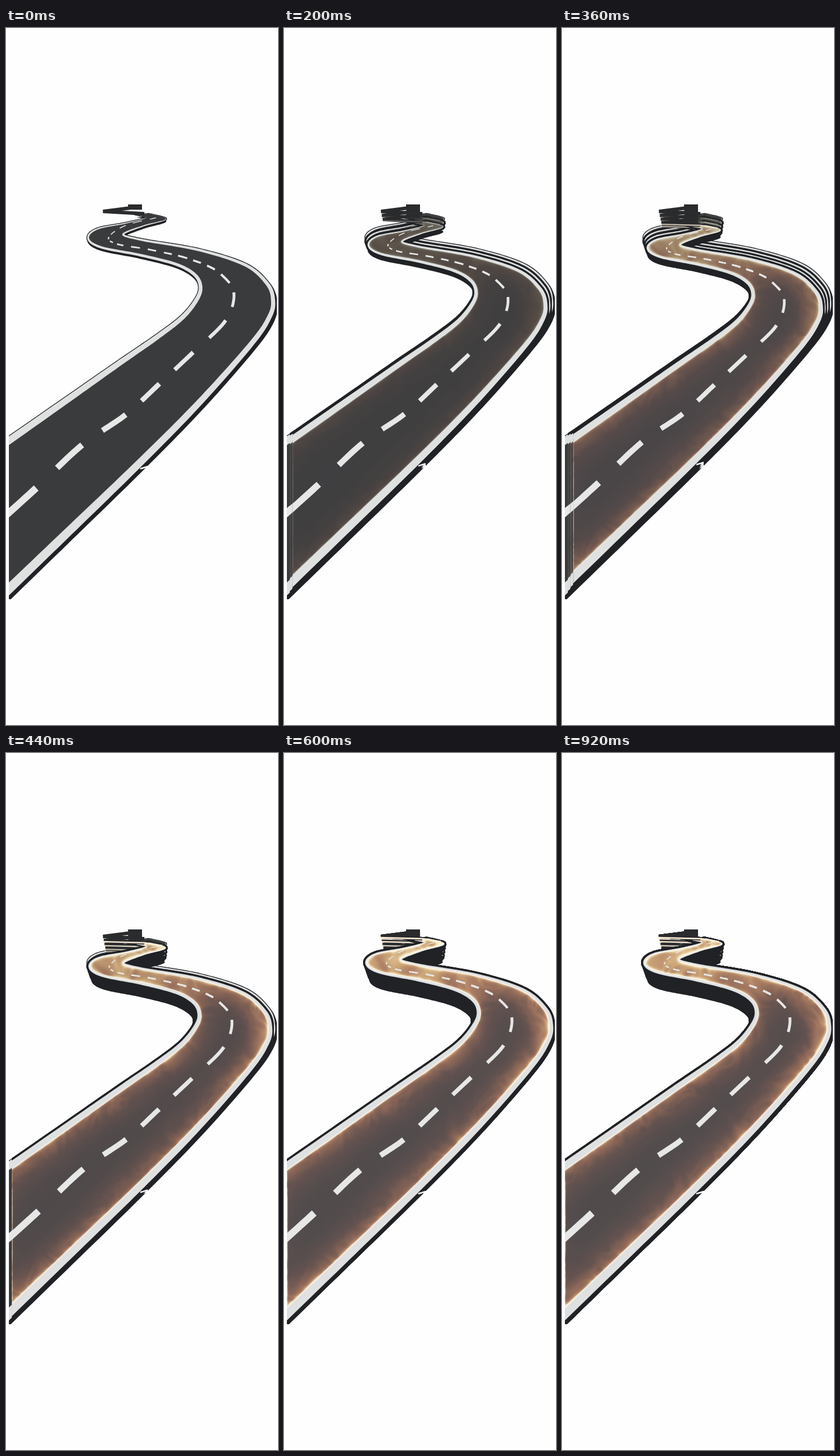
Animation, 468 px wide and 1197 px high, one loop 0.96 s. Source, as an HTML page with a canvas:

```html
<!DOCTYPE html>
<html lang="en">
<head>
<meta charset="utf-8">
<title>Glowing road</title>
<style>
  html, body { margin: 0; width: 100%; height: 100%; overflow: hidden; background: #fefefe; }
  canvas { display: block; width: 468px; height: 1197px; }
</style>
</head>
<body>
<canvas id="stage" width="468" height="1197"></canvas>
<script>
const W = 468, H = 1197, LOOP = 960, STEP = 40, FIRST = 4;
const ctx = document.getElementById('stage').getContext('2d');
const clamp = (v, a = 0, b = 1) => Math.min(b, Math.max(a, v));

// Key points from the near end to the far end
const leftKeys = [[-40, 748], [100, 649], [200, 578], [260, 536], [305, 501], [330, 470], [338, 446],
  [328, 423], [295, 404], [232, 388], [165, 375], [143, 361], [158, 346], [206, 336], [241, 326], [225, 321]];
const rightKeys = [[-40, 995], [100, 862], [228, 740], [330, 638], [420, 538], [450, 494], [456, 468],
  [447, 441], [410, 409], [330, 383], [230, 365], [200, 354], [236, 339], [275, 328], [246, 319]];
// Each point is the far end of one dash
const dashKeys = [[-30, 864], [52, 790], [131, 716], [206, 664], [264, 611], [322, 557], [378, 502],
  [392, 454], [370, 423], [346, 408], [322, 399], [296, 391], [244, 380], [191, 371], [177, 359],
  [206, 339], [258, 326]];

// Catmull-Rom point at parameter u
function pointAt(keys, u) {
  const i = clamp(Math.floor(u), 0, keys.length - 2), f = u - i;
  const [a, b, c, d] = [-1, 0, 1, 2].map(k => keys[clamp(i + k, 0, keys.length - 1)]);
  return [0, 1].map(n => b[n] + f / 2 * (c[n] - a[n]
    + f * (2 * a[n] - 5 * b[n] + 4 * c[n] - d[n] + f * (3 * (b[n] - c[n]) + d[n] - a[n]))));
}
function sample(keys, from = 0, to = keys.length - 1) {
  const n = Math.ceil((to - from) * 14);
  return Array.from({ length: n + 1 }, (_, i) => pointAt(keys, from + (to - from) * i / n));
}
// Push a line sideways by a width that depends on y
function offset(pts, side, width) {
  return pts.map(([x, y], i) => {
    const p = pts[Math.max(i - 1, 0)], q = pts[Math.min(i + 1, pts.length - 1)];
    const dx = q[0] - p[0], dy = q[1] - p[1], k = side * width(y) / Math.hypot(dx, dy);
    return [x - dy * k, y + dx * k];
  });
}
function line(pts) {
  const path = new Path2D();
  pts.forEach(p => path.lineTo(...p));
  return path;
}
const ribbon = (a, b) => line([...a, ...[...b].reverse()]);

const borderWidth = y => .46 * Math.max(0, y - 325) ** .55;
const wallWidth = y => 1 + 6 * clamp((y - 440) / 60);
const dashWidth = y => Math.max(1.3, .115 * Math.max(0, y - 315) ** .75);

const left = sample(leftKeys), right = sample(rightKeys);
const rightEdge = offset(right, 1, borderWidth);
const banks = [line(left), line(right)];
const asphalt = ribbon(left, right);
const body = ribbon(offset(left, -1, borderWidth), rightEdge);
const wall = ribbon(rightEdge, offset(rightEdge, 1, wallWidth));
const tip = line([[238, 319], [167, 315], [222, 308]]);
const tipGlow = line([[165, 317], [240, 319], [270, 324]]);
const notch = line([[231, 757], [244, 753]]);

const dashes = dashKeys.slice(1).flatMap((key, i) => {
  const far = key[1] < 400 && i > 10;
  const parts = far ? [[0, .26], [.5, .76]] : [[0, .55]];
  return parts.map(([a, b]) => ({
    path: line(sample(dashKeys, i + 1 - b, i + 1 - a)),
    width: dashWidth(key[1] + 10)
  }));
});

// Value noise
function hash(x, y) {
  let h = Math.imul(x, 374761393) + Math.imul(y, 668265263) | 0;
  h = Math.imul(h ^ h >>> 13, 1274126177);
  return ((h ^ h >>> 16) >>> 0) / 4294967295;
}
function noise(x, y) {
  const i = Math.floor(x), j = Math.floor(y);
  let u = x - i, v = y - j;
  u *= u * (3 - 2 * u);
  v *= v * (3 - 2 * v);
  const top = hash(i, j) + (hash(i + 1, j) - hash(i, j)) * u;
  const low = hash(i, j + 1) + (hash(i + 1, j + 1) - hash(i, j + 1)) * u;
  return top + (low - top) * v;
}

// Half-size texture of the fire along the banks
const GW = W / 2, GH = 340, TOP = 302;
function sheet() {
  const c = document.createElement('canvas');
  c.width = GW;
  c.height = GH;
  return c;
}
function blurred(radius) {
  const g = sheet().getContext('2d', { willReadFrequently: true });
  g.filter = `blur(${radius}px)`;
  g.scale(.5, .5);
  g.translate(0, -TOP);
  g.beginPath();
  g.rect(5, TOP, W, GH * 2);
  g.clip();
  g.fill(asphalt);
  return g.getImageData(0, 0, GW, GH).data;
}
const wide = blurred(17), thin = blurred(1.8);
const ramp = [[0, 80, 75, 76], [.3, 101, 83, 80], [.55, 138, 102, 87], [.8, 174, 129, 102],
  [1, 208, 170, 124], [1.3, 255, 243, 205]];
function heat(v) {
  let k = 1;
  while (k < ramp.length - 1 && v > ramp[k][0]) k++;
  const a = ramp[k - 1], b = ramp[k], f = clamp((v - a[0]) / (b[0] - a[0]));
  return [1, 2, 3].map(i => a[i] + (b[i] - a[i]) * f);
}
function fire(step) {
  const c = sheet(), g = c.getContext('2d'), img = g.createImageData(GW, GH);
  const drift = step * .07;
  for (let y = 0; y < GH; y++) for (let x = 0; x < GW; x++) {
    const o = (y * GW + x) * 4;
    if (thin[o + 3] < 25) continue;
    const near = clamp(2 - wide[o + 3] / 127.5, 0, 1.1);
    const rim = clamp(2 - thin[o + 3] / 127.5);
    const wx = noise(x / 22 + drift, y / 22) * 2, wy = noise(x / 22 + 40, y / 22 - drift) * 2;
    const soft = noise(x / 18 + wx, y / 18 + wy);
    const wisp = 1 - Math.abs(2 * noise(x / 7 + wx * 1.5, y / 7 + wy * 1.5 + drift) - 1);
    const n = soft * .6 + wisp * .4;
    const far = clamp((415 - TOP - y * 2) / 60) * .2;
    const v = .72 * near * (.6 + .6 * n) + .5 * rim * (.2 + n) + far;
    img.data.set([...heat(v), 255], o);
  }
  g.putImageData(img, 0, 0);
  return c;
}
const fires = Array.from({ length: LOOP / STEP }, (_, i) => i < FIRST ? null : fire(i));

// Pulse runs from 80 to 520 ms, the glow fades in meanwhile
const shrink = t => t < 160 || t > 520 ? 1 : 1 - .075 * Math.sin(Math.PI * (t - 80) / 440) ** 2;
const glowAt = t => t < 160 ? 0 : clamp((t - 120) / 340);

function stroke(path, width, color, alpha = 1) {
  ctx.globalAlpha = alpha;
  ctx.strokeStyle = color;
  ctx.lineWidth = width;
  ctx.stroke(path);
  ctx.globalAlpha = 1;
}
function fill(path, color) {
  ctx.fillStyle = color;
  ctx.fill(path);
}
function road(step) {
  const t = step * STEP, s = shrink(t), glow = glowAt(t);
  const dark = '#202225';
  ctx.save();
  ctx.translate(235, 641);
  ctx.scale(s, s);
  ctx.translate(-235, -641);
  ctx.beginPath();
  ctx.rect(5, 300, 461, 681);
  ctx.clip();

  ctx.translate(0, glow ? 9 : 4);
  fill(body, dark);
  ctx.translate(0, glow ? -9 : -4);
  stroke(body, glow ? 7 : 2.5, dark);
  fill(wall, dark);
  fill(body, '#dfe1e1');
  fill(asphalt, '#3a3b3d');

  if (glow) {
    ctx.save();
    ctx.clip(asphalt);
    ctx.globalAlpha = glow;
    ctx.drawImage(fires[step], 0, TOP, W, GH * 2);
    ctx.restore();
    banks.forEach(b => stroke(b, 2.4, '#fffaf0', glow * .75));
  }
  stroke(tip, 6, '#292b2d');
  ctx.fillRect(210, 303, 24, 9);
  fill(new Path2D('M210 303h24v9h-24z'), '#292b2d');
  if (glow) stroke(tipGlow, 2.6, '#fff0dc', glow);

  dashes.forEach(d => stroke(d.path, d.width, '#e6e7e6'));
  stroke(notch, 2.5, '#fefefe');
  ctx.restore();
}

// Each step is laid over the ones before it, which leaves the trails
function draw(step) {
  ctx.fillStyle = '#fefefe';
  ctx.fillRect(0, 0, W, H);
  road(0);
  for (let i = FIRST; i <= step; i++) road(i);
}

let shown = -1;
const start = performance.now();
function tick() {
  const step = Math.floor((performance.now() - start) % LOOP / STEP);
  if (step !== shown) draw(shown = step);
  requestAnimationFrame(tick);
}
tick();
</script>
</body>
</html>
```
